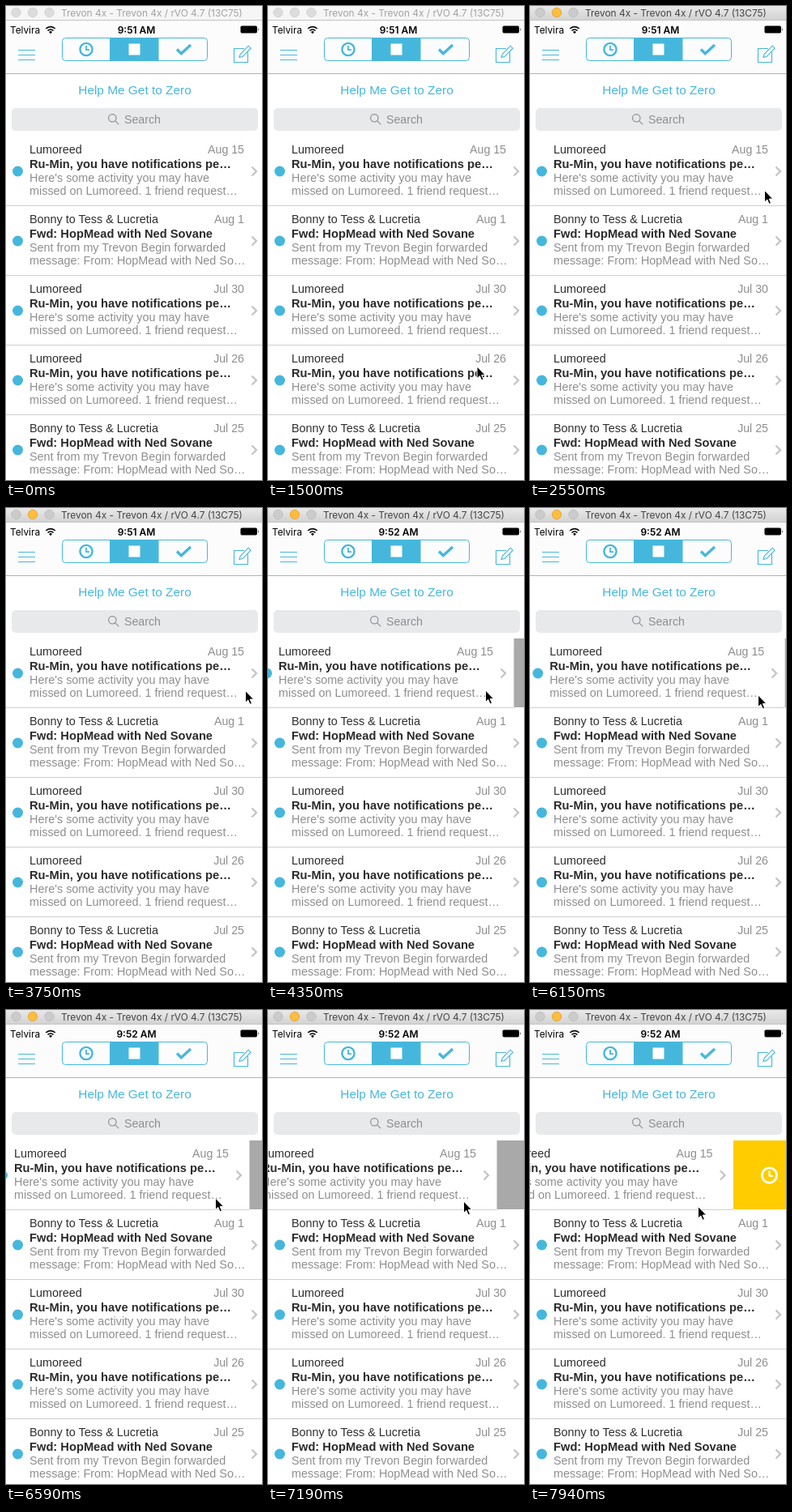
These frames come from a looping animation (316 px wide and 585 px high, 8 s). An HTML page:

```html
<!DOCTYPE html>
<html lang="en">
<head>
<meta charset="utf-8">
<title>Inbox swipe</title>
<style>
  html, body { margin: 0; width: 100%; height: 100%; overflow: hidden; background: #fff; }
  svg { display: block; width: 316px; height: 585px; font: 14.4px "Liberation Sans", Arial, sans-serif; }
  .ui { font-family: Inter, Roboto, sans-serif; }
  .line { fill: none; stroke: #46b7dc; }
  .blue { fill: #46b7dc; }
  .sender { fill: #2e2e2e; }
  .subject { fill: #2b2b2b; font-weight: bold; font-size: 14.7px; }
  .grey { fill: #8e8e90; }
  .end { text-anchor: end; }
  .mid { text-anchor: middle; }
</style>
</head>
<body>
<svg viewBox="0 0 316 585">
  <defs>
    <linearGradient id="bar" x2="0" y2="1">
      <stop stop-color="#e9e9e9"/><stop offset="1" stop-color="#d2d2d2"/>
    </linearGradient>
    <g id="clock" fill="none">
      <circle r="7.6" stroke-width="2.4"/>
      <path d="M0-4.5V.6H4" stroke-width="1.8"/>
    </g>
  </defs>

  <!-- Mail list -->
  <rect id="under" y="161" width="316" height="85"/>
  <use id="later" href="#clock" transform="translate(295.5 204) scale(1.2)" stroke="#fff"/>
  <g id="rows"></g>

  <!-- Window title -->
  <rect id="titlebar" width="316" height="17.5"/>
  <path d="M0 17.5H316" stroke="#c4c4c4"/>
  <g id="lights" stroke-width=".8">
    <circle cx="12.5" cy="8" r="5.7"/><circle cx="33" cy="8" r="5.7"/><circle cx="53.5" cy="8" r="5.7"/>
  </g>
  <text id="title" class="ui mid" x="180" y="12.7" font-size="11.9">Trevon 4x - Trevon 4x / rVO 4.7 (13C75)</text>

  <!-- Status bar -->
  <rect y="18" width="316" height="65" fill="#fcfcfc"/>
  <text class="ui" x="5" y="33.5" font-size="11.8">Telvira</text>
  <g fill="none" stroke="#000" stroke-width="1.7">
    <path d="M49.3 28a8 8 0 0 1 11.4 0M51.5 30.5a5 5 0 0 1 7 0"/>
  </g>
  <path d="M55 34.2l-2-2.2a3 3 0 0 1 4 0z"/>
  <text id="time" class="ui mid" x="161" y="33.5" font-size="12" font-weight="600"></text>
  <rect x="289.5" y="24.5" width="20.5" height="9" rx="1.8"/>
  <path d="M311.2 27.2q1.6 1.8 0 3.6z"/>

  <!-- Navigation -->
  <path class="line" d="M15 54.5H36M15 60.5H36M15 66.5H36" stroke-width="1.2"/>
  <rect class="line" x="69.5" y="39.5" width="179" height="28" rx="4"/>
  <rect class="blue" x="128" y="39.5" width="60.5" height="28"/>
  <use href="#clock" x="99" y="53.5" stroke="#46b7dc"/>
  <rect x="151.5" y="46.5" width="14" height="14" fill="#fff"/>
  <path class="line" d="M211 53.5l5.3 5.2L228 48" stroke-width="3.4"/>
  <path class="line" d="M294 52.5H281.5V69.5H298.5V57M288 63.5l1.3-4.2L299.2 49.2l3 3L292.2 62.3z" stroke-width="1.1"/>
  <path d="M0 83.5H316" stroke="#b2b2b2"/>
  <text class="blue mid" x="159" y="108.7" font-size="15.4">Help Me Get to Zero</text>
  <rect x="7" y="126" width="304" height="28" rx="5" fill="#e8e9eb"/>
  <g fill="none" stroke="#8e8e93" stroke-width="1.2">
    <circle cx="131.3" cy="138.3" r="4.7"/><path d="M134.8 141.8l4.4 4.4"/>
  </g>
  <text class="grey" x="146" y="144.7" font-size="14.2">Search</text>

  <path id="cursor" d="M0 0V14.6L3.3 11.5 5.6 16.8 8 15.8 5.7 10.6H10.2z" stroke="#fff"/>
</svg>

<script>
const $ = id => document.getElementById(id);

const social = ["Lumoreed", "Ru-Min, you have notifications pe…",
  "Here's some activity you may have", "missed on Lumoreed. 1 friend request…"];
const forward = ["Bonny to Tess & Lucretia", "Fwd: HopMead with Ned Sovane",
  "Sent from my Trevon Begin forwarded", "message: From: HopMead with Ned So…"];
const mails = [[social, "Aug 15"], [forward, "Aug 1"], [social, "Jul 30"], [social, "Jul 26"], [forward, "Jul 25"]];

$("rows").innerHTML = mails.map(([[sender, subject, first, second], date], i) => `
  <g transform="translate(0 ${161 + i * 86})"><g>
    <rect width="319.5" height="86" fill="#fff"/>
    <path d="M0 85.5H319.5" stroke="#cfcfcf"/>
    <circle class="blue" cx="14.5" cy="43" r="6.5"/>
    <text class="sender" x="29" y="21">${sender.replace("&", "&amp;")}</text>
    <text class="grey end" x="294" y="21" font-size="14.2">${date}</text>
    <text class="subject" x="29" y="38.7">${subject}</text>
    <text class="grey" x="29" y="56">${first}</text>
    <text class="grey" x="29" y="72.3">${second}</text>
    <path d="M303.5 37.5l5.5 5.5-5.5 5.5" fill="none" stroke="#c3c3c6" stroke-width="2.2"/>
  </g></g>`).join("");
const swiped = $("rows").firstElementChild.firstElementChild;

// Keys: [time, ...values]
const pointer = [[1350, 222, 566], [1650, 293, 323], [2100, 290, 261], [2550, 289, 227], [2700, 289, 227],
  [3300, 279, 228], [3450, 279, 228], [3750, 295, 225], [3900, 295, 225], [4350, 268, 224.5], [4800, 254, 226],
  [4950, 253, 226.5], [5250, 253, 226.5], [5550, 289, 230], [6000, 289, 230], [6590, 258, 231.5],
  [7190, 241, 235.5], [7940, 207, 242]];
const drag = [[3900, 0], [4050, -2], [4350, -16], [4800, -28], [4950, -15], [5100, 0], [6000, 0],
  [6590, -19], [7190, -37], [7940, -68.5]];

function at(keys, t) {
  const n = keys.findIndex(k => k[0] > t);
  if (n < 1) return keys.at(n).slice(1);
  const a = keys[n - 1], b = keys[n], p = (t - a[0]) / (b[0] - a[0]);
  return a.slice(1).map((v, i) => v + (b[i + 1] - v) * p);
}

// The screen refreshes every 150 ms, with one slightly shorter step.
const hold = t => {
  const start = t < 6440 ? 0 : 6440;
  return start + Math.floor((t - start) / 150) * 150;
};

function draw(t) {
  const [x, y] = at(pointer, t), [dx] = at(drag, t);
  const active = t >= 2400, armed = dx <= -60;

  $("cursor").setAttribute("transform", `translate(${x + .5} ${y + .5})`);
  $("cursor").style.display = t < 1350 || (t >= 1800 && t < 2100) ? "none" : "";
  swiped.setAttribute("transform", `translate(${dx})`);
  $("under").setAttribute("fill", armed ? "#fc0" : "#a9a9a9");
  $("later").setAttribute("opacity", Math.min(1, Math.max(0, (-dx - 37) / 23)));

  $("time").textContent = t < 4200 ? "9:51 AM" : "9:52 AM";
  $("titlebar").setAttribute("fill", active ? "url(#bar)" : "#f6f6f6");
  $("title").setAttribute("fill", active ? "#444" : "#a2a2a2");
  [...$("lights").children].forEach((light, i) => {
    const yellow = active && i === 1;
    light.setAttribute("fill", yellow ? "#fdbd3f" : active ? "#cbcbcb" : "#dcdcdc");
    light.setAttribute("stroke", yellow ? "#e0a02f" : active ? "#b9b9b9" : "#cdcdcd");
  });
}

function tick() {
  draw(hold(performance.now() % 8000));
  requestAnimationFrame(tick);
}
tick();
</script>
</body>
</html>
```
